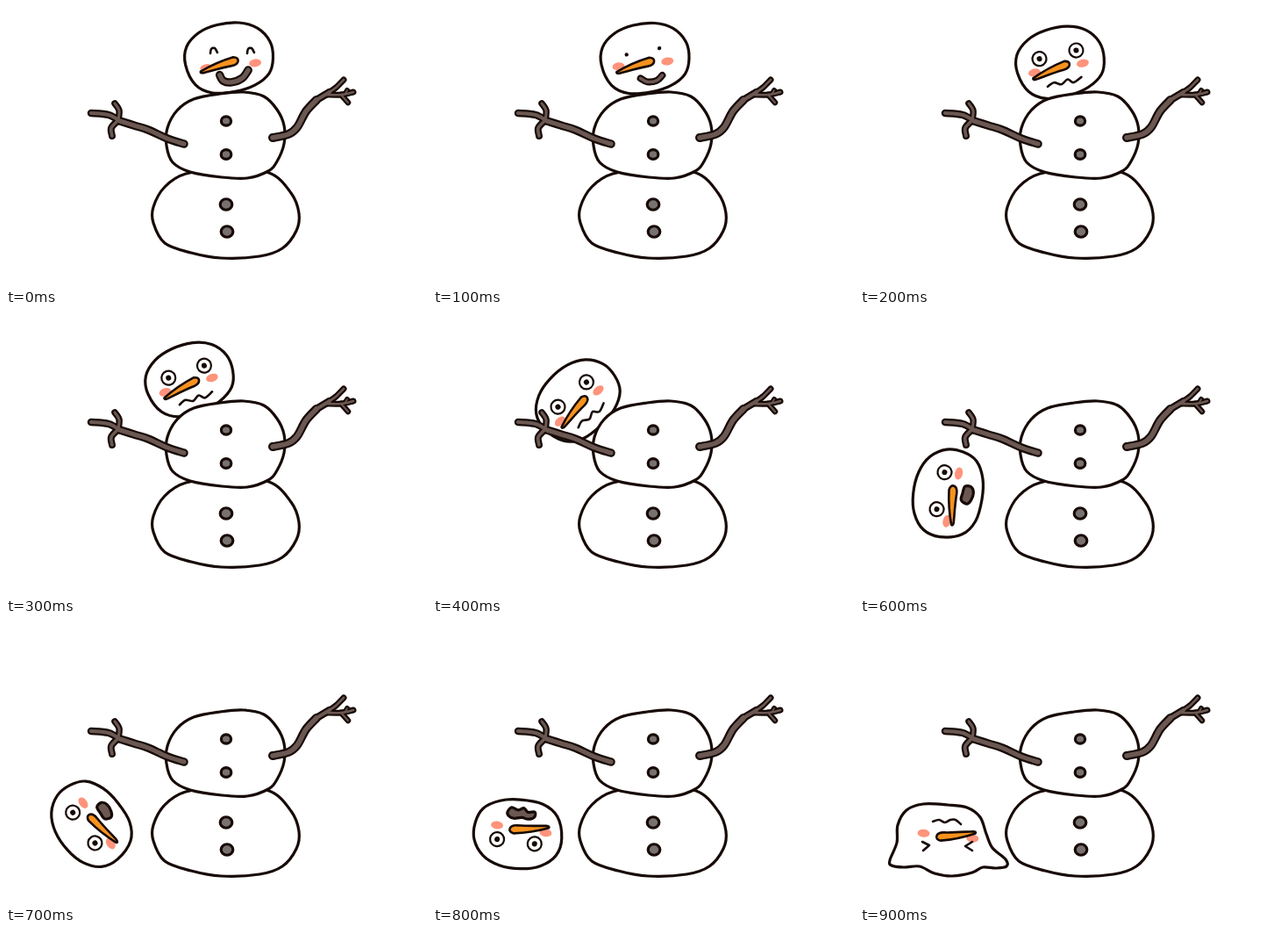
Write an HTML page that moves like this. It is 480 px wide and 320 px high and loops after 1 s.

```html
<!DOCTYPE html>
<html lang="en">
<head>
<meta charset="utf-8">
<title>Snowman</title>
<style>
html, body { margin: 0; width: 100%; height: 100%; overflow: hidden; background: #fff; }
svg { display: block; width: 100vw; height: 100vh; }
.ink { stroke: #170a06; stroke-width: 3.2; stroke-linejoin: round; stroke-linecap: round; fill: #fff; }
.line { fill: none; stroke-width: 2.6; }
.fill { fill: #6b5853; }
.twig { fill: none; stroke-linecap: round; stroke-linejoin: round; }
</style>
</head>
<body>
<svg id="stage" viewBox="0 0 480 320"></svg>
<script>
const INK = '#170a06', WOOD = '#6b5853';

// Smooth curve through "x,y x,y ..." points
function curve(text, closed) {
  const p = text.split(' ').map(s => s.split(',').map(Number));
  const n = p.length;
  const at = i => closed ? p[(i + n) % n] : p[Math.max(0, Math.min(n - 1, i))];
  let d = 'M' + p[0];
  for (let i = 0; i < (closed ? n : n - 1); i++) {
    const [a, b, c, e] = [at(i - 1), at(i), at(i + 1), at(i + 2)];
    const c1 = b.map((v, k) => (v + (c[k] - a[k]) / 6).toFixed(2));
    const c2 = c.map((v, k) => (v - (e[k] - b[k]) / 6).toFixed(2));
    d += `C${c1} ${c2} ${c}`;
  }
  return d + (closed ? 'Z' : '');
}
const shape = (pts, cls = '') => `<path class="ink ${cls}" d="${curve(pts, true)}"/>`;
const line = pts => `<path class="ink line" d="${curve(pts)}"/>`;
const oval = (x, y, rx, ry, attrs) => `<ellipse cx="${x}" cy="${y}" rx="${rx}" ry="${ry}" ${attrs}/>`;

// Outlined strokes: all dark first, then the lighter core
function tubes(list) {
  const pass = (color, cut) => list.map(([w, pts]) =>
    `<path class="twig" stroke="${color}" stroke-width="${w - cut}" d="${curve(pts)}"/>`).join('');
  return pass(INK, 0) + pass(WOOD, 4.4);
}

const button = (x, y, r) => oval(x, y, r, r * 0.92, 'class="ink" style="fill:#77716f"');

const body =
  shape('205,191 181,206 168,229 168,247 181,270 211,281 245,287 289,285 315,276 331,256 334,236 325,213 300,190 250,186') +
  shape('214,106 244,100 271,98 294,103 309,118 317,136 317,157 309,177 299,188 275,196 246,195 210,189 190,178 183,159 184,139 195,119') +
  button(251, 131, 5.6) + button(251, 169, 5.8) + button(251, 226, 6.8) + button(252, 257, 6.8) +
  tubes([
    [9.5, '203,157 184,151 162,141 146,136 130,131'],
    [8.5, '130,131 117,124 97,122'],
    [7.5, '128,130 129,119 124,111'],
    [8, '127,131 120,139 121,148'],
    [10, '304,150 322,146 332,138 342,120 354,107'],
    [8.5, '354,107 369,98'],
    [7, '369,98 376,93 385,84'],
    [7, '366,101 382,101 396,98'],
    [6.5, '382,101 390,110'],
    [6, '386,101 389,96']
  ]);

const cheeks = (dx = 0, dy = 0) =>
  oval(-31 + dx, 5 + dy, 7, 4.5, 'fill="#ff937b"') + oval(25 + dx, 7 + dy, 7, 4.5, 'fill="#ff937b"');
const nose = '<path class="ink" style="fill:#f7921e;stroke-width:2.6" ' +
  'd="M-34 11C-22 6 -8 2 5 0Q11 1 10 5Q9 9 2 9.500C-10 10 -22 12 -31 13Q-35 13 -34 11Z"/>';

const ring = (x, y, r) =>
  oval(x, y, r, r, 'class="ink" style="stroke-width:2.2"') + oval(x, y, r * 0.38, r * 0.38, `fill="${INK}"`);
const wide = ring(-20, -9, 8) + ring(23, -9, 8);
const startled = ring(-22, -9, 8) + ring(21, -9, 8);
const dots = oval(-20, -7, 2.2, 2.2, `fill="${INK}"`) + oval(18, -9, 2.2, 2.2, `fill="${INK}"`);
const arch = (x, y) => line(`${x - 4},${y + 4} ${x - 3},${y - 1} ${x + 1},${y - 2} ${x + 4},${y + 3}`);
const happy = `<g transform="rotate(8)">${arch(-17, -9)}${arch(25, -9)}</g>`;

const grin = tubes([[9.5, '-13,18 -10,25 -1,28 12,25 20,17']]);
const smile = tubes([[8, '-8,22 -1,27 10,27 17,22']]);
const wave = line('-20,24 -12,21 -4,25 4,21 10,26 20,22');
const gasp = shape('-7,23 -4,16 4,16 12,17 13,24 7,28 -2,27', 'fill');
const wobble = shape('15,23 11,29 3,27 -3,30 -8,26 -16,27 -16,21 -9,18 -2,19 7,17 13,19', 'fill');

const skull = shape('-50,1 -46,-19 -30,-33 -8,-39 17,-38 37,-29 49,-12 50,7 43,24 25,35 2,39 -24,37 -42,25');

const place = (x, y, turn, inner) => `<g transform="translate(${x} ${y}) rotate(${turn})">${inner}</g>`;
const head = (x, y, turn, face, blush = cheeks()) => place(x, y, turn, skull + blush + face + nose);

const melted =
  shape('34,269 42,249 43,229 53,212 72,205 100,206 122,209 137,220 144,239 151,255 166,268 167,276 155,278 140,277 128,283 105,287 85,284 68,276 50,277 36,275') +
  place(97, 247, -176, cheeks() + nose) +
  line('83,225 90,223 97,226 103,223 109,223 115,228') +
  '<path class="ink line" d="M71 248L79 252L72 258M128 248L120 253L128 258"/>';

const poses = [
  head(254, 59, -8, happy + grin, cheeks(4, 3)),
  head(241.5, 59.5, -8, dots + smile),
  head(228, 64, -13, startled + wave),
  head(209, 73, -19, startled + wave),
  head(165, 97, -41, startled + wave),
  head(117, 132, -63, wide + gasp),
  head(100.5, 203.5, -78, wide + gasp),
  head(97, 228, -126, wide + gasp),
  head(97, 239, -173, wide + wobble),
  melted
];

const stage = document.getElementById('stage');
stage.innerHTML = poses.map(p => `<g class="pose" display="none">${p}</g>`).join('') + body;
const groups = [...stage.querySelectorAll('.pose')];

const STEP = 100;
const start = performance.now();
let shown = -1;
function draw(now) {
  const i = Math.floor(Math.max(0, now - start) / STEP) % groups.length;
  if (i !== shown) {
    groups.forEach((g, k) => g.setAttribute('display', k === i ? 'inline' : 'none'));
    shown = i;
  }
  requestAnimationFrame(draw);
}
draw(start);
</script>
</body>
</html>
```
